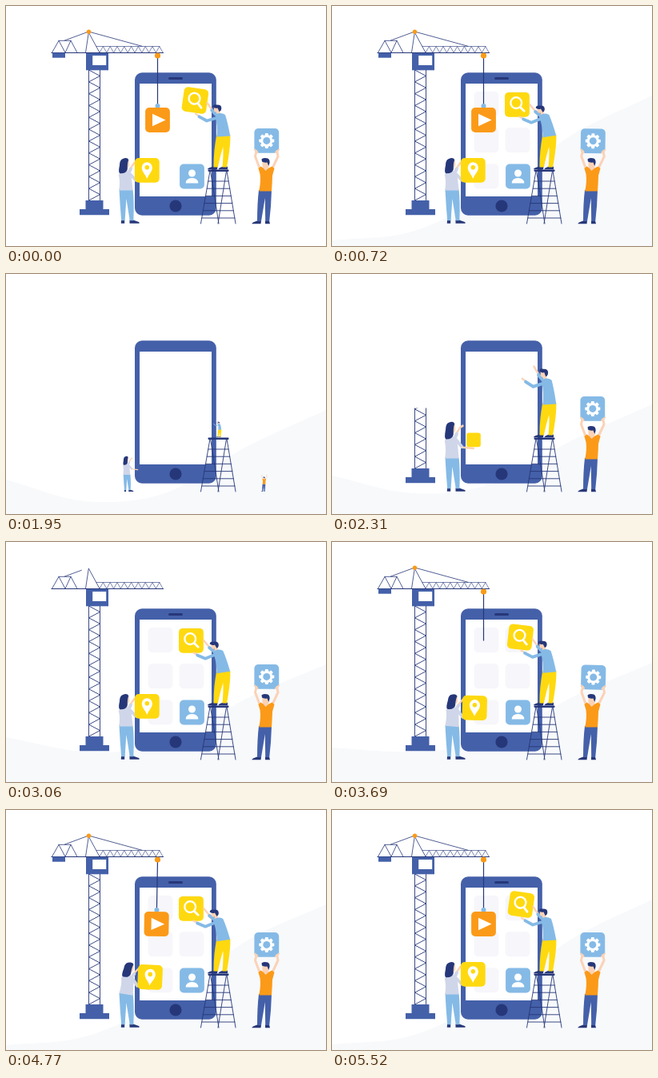
An HTML page with a canvas for the animation above (5.55 s loop, 400 by 300 pixels).

```html
<!DOCTYPE html>
<html lang="en">
<head>
<meta charset="utf-8">
<title>Building an app</title>
<style>
html, body { margin: 0; width: 100%; height: 100%; overflow: hidden; background: #fff; }
canvas { display: block; width: 100vw; height: 100vh; }
</style>
</head>
<body>
<canvas id="stage"></canvas>
<script>
const LOOP = 5550, BUILD = 1410;
const BLUE = '#4460a9', NAVY = '#263779', SKY = '#85bae6', YELLOW = '#ffd90f',
  ORANGE = '#fb9a18', SKIN = '#fbd2b6', LILAC = '#d0d6e9', WHITE = '#fff',
  WAVE = '#f7f9fb', SLOT = '#f6f6fb';

const canvas = document.getElementById('stage');
const ctx = canvas.getContext('2d');
const dpr = window.devicePixelRatio || 1;
canvas.width = 400 * dpr;
canvas.height = 300 * dpr;

const clamp = v => Math.max(0, Math.min(1, v));
const ease = u => u < 0.5 ? 2 * u * u : 1 - 2 * (1 - u) * (1 - u);
const ramp = (t, a, b) => clamp((t - a) / (b - a));
const ramped = (t, a, b) => ease(ramp(t, a, b));
const mix = (a, b, u) => a + (b - a) * u;

function fill(color, d) {
  ctx.fillStyle = color;
  ctx.fill(new Path2D(d));
}

function stroke(color, width, d) {
  ctx.strokeStyle = color;
  ctx.lineWidth = width;
  ctx.lineCap = ctx.lineJoin = 'round';
  ctx.stroke(new Path2D(d));
}

function box(color, x, y, w, h, r = 0) {
  if (w <= 0 || h <= 0) return;
  ctx.fillStyle = color;
  ctx.beginPath();
  ctx.roundRect(x, y, w, h, Math.min(r, w / 2, h / 2));
  ctx.fill();
}

function dot(color, x, y, r) {
  if (r <= 0) return;
  ctx.fillStyle = color;
  ctx.beginPath();
  ctx.arc(x, y, r, 0, 7);
  ctx.fill();
}

// Draws in coordinates centred on x, y
function at(x, y, draw, sx = 1, sy = sx, angle = 0) {
  if (sx <= 0 || sy <= 0) return;
  ctx.save();
  ctx.translate(x, y);
  ctx.rotate(angle);
  ctx.scale(sx, sy);
  draw();
  ctx.restore();
}

// Draws in stage coordinates, transformed around a pivot
function around(x, y, draw, sx = 1, sy = sx, angle = 0) {
  at(x, y, () => { ctx.translate(-x, -y); draw(); }, sx, sy, angle);
}

function clipped(x, y, w, h, draw) {
  ctx.save();
  ctx.beginPath();
  ctx.rect(x, y, w, h);
  ctx.clip();
  draw();
  ctx.restore();
}

function zigzag(points) {
  return 'M' + points.map(p => p.join(' ')).join('L');
}

const tile = color => box(color, -15.4, -15.4, 30.8, 30.8, 5);

// Time, then wave heights at x = 0, 100, 200, 300, 400
const waves = [
  [1410, 265, 299, 291, 229, 180],
  [1530, 263, 296, 287, 226, 178],
  [2310, 252, 274, 262, 208, 163],
  [3060, 244, 262, 252, 196, 153],
  [3690, 257, 262, 248, 194, 151],
  [4770, 294, 283, 237, 164, 118],
  [5520, 293, 282, 233, 161, 112]
];

function drawWave(b) {
  let i = 0;
  while (i < waves.length - 2 && b > waves[i + 1][0]) i++;
  const u = ramp(b, waves[i][0], waves[i + 1][0]);
  const y = waves[i].slice(1).map((v, n) => mix(v, waves[i + 1][n + 1], u));
  const slope = n => n === 0 ? y[1] - y[0] : n === 4 ? y[4] - y[3] : (y[n + 1] - y[n - 1]) / 2;
  let d = `M0 300V${y[0]}`;
  for (let n = 0; n < 4; n++) {
    const x = n * 100;
    d += `C${x + 33.3} ${y[n] + slope(n) / 3} ${x + 66.7} ${y[n + 1] - slope(n + 1) / 3} ${x + 100} ${y[n + 1]}`;
  }
  fill(WAVE, d + 'V300Z');
}

function drawPhone(b, light) {
  const h = 178.4 * ramped(b, 1410, 1860), top = 261.7 - h;
  box(BLUE, 161, top, 101.8, h, 9);
  box(WHITE, 167, top + 13.7, 90, h - 37.5);
  dot(NAVY, 212, 250, 7.6 * ramped(b, 1700, 1900));
  const s = ramped(b, 2380, 2560);
  box(NAVY, 212 - 9 * s, 89, 18 * s, 3, 1.5);
  if (!light) return;
  for (let i = 0; i < 6; i++) {
    const x = 193 + (i % 2) * 39, y = 122.5 + (i >> 1) * 45.2;
    at(x, y, () => tile(SLOT), ramped(b, 2400 + i * 30, 2650 + i * 30));
  }
}

function drawUser(b) {
  at(232.5, 213, () => {
    tile(SKY);
    dot(WHITE, 0, -4, 4.5);
    fill(WHITE, 'M-7.8 8.5Q-7.5 2 0 2Q7.5 2 7.8 8.5Z');
  }, ramped(b, 2550, 2850));
}

function drawSearch(b, tilt) {
  at(mix(231.4, 236.4, tilt), mix(123.3, 118, tilt), () => {
    tile(YELLOW);
    ctx.strokeStyle = WHITE;
    ctx.lineWidth = 2.3;
    ctx.beginPath();
    ctx.arc(-1.2, -2.2, 6.9, 0, 7);
    ctx.stroke();
    stroke(WHITE, 2.8, 'M4.2 3.4L8.8 8');
  }, ramped(b, 2500, 2800), undefined, 0.14 * tilt);
}

function drawPin(b, bend) {
  const s = ramped(b, 2150, 2450);
  at(mix(178, 176.3, s) + 4 * bend, mix(210, 205.4, s) + 3.8 * bend, () => {
    tile(YELLOW);
    const p = ramped(b, 2400, 2600);
    at(0, 0, () => {
      fill(WHITE, 'M0 10.5C-2 5-6.6 2-6.6-3.6A6.6 6.6 0 0 1 6.6-3.6C6.6 2 2 5 0 10.5Z');
      dot(YELLOW, 0, -3.6, 2.8);
    }, p);
  }, s, s, 0.05 * bend);
}

function drawCrane(b, t) {
  const base = ramped(b, 1980, 2180);
  clipped(90, 262 - 20 * base, 42, 20 * base, () => {
    box(BLUE, 92, 254, 37, 7.3);
    box(BLUE, 99.5, 243, 22, 11.5);
  });

  const rise = 163 * ramp(b, 2200, 2440);
  clipped(100, 243 - rise, 22, rise, () => {
    const nodes = [];
    for (let i = 0; i <= 22; i++) nodes.push([i % 2 ? 117.5 : 103.5, 80 + i * 7.41]);
    stroke(NAVY, 0.9, 'M103.5 80V243M117.5 80V243' + zigzag(nodes));
  });

  const cab = ramped(b, 2400, 2510);
  around(114, 80, () => {
    box(BLUE, 100, 58.3, 28, 22);
    box(WHITE, 108.2, 62, 17, 12);
  }, cab);

  const jib = ramped(b, 2420, 2520);
  if (jib > 0) stroke(NAVY, 1.2, `M${114 - 57 * jib} 58.5H${114 + 82.5 * jib}`);
  const lattice = ramped(b, 2500, 2800);
  clipped(114 - 58 * lattice, 40, 142 * lattice, 20, () => {
    stroke(NAVY, 0.8, 'M57.5 58.3L66 43.3L74 58.3L81 43.3L89 58.3M66 43.3H81');
    const nodes = [];
    for (let i = 0; i <= 18; i++) nodes.push([117 + i * 4.4, i % 2 ? 50.5 : 58.3]);
    stroke(NAVY, 0.6, zigzag(nodes) + 'M113 50.5H192');
  });
  const peak = 26 * ramped(b, 2780, 2950);
  clipped(98, 59 - peak, 22, peak, () => stroke(NAVY, 0.8, 'M99.5 58.3L103.3 33L117 58.3'));
  const tie = ramp(b, 2970, 3100), stay = ramped(b, 3100, 3300);
  if (tie > 0) stroke(NAVY, 0.8, `M73.5 43L${mix(73.5, 103.3, tie)} ${mix(43, 32, tie)}`);
  if (stay > 0) stroke(NAVY, 0.8, `M103.3 32L${mix(103.3, 170, stay)} ${mix(32, 50.3, stay)}`);
  box(BLUE, 58, 58.5, 16, 6.2 * ramped(b, 3100, 3300));
  dot(ORANGE, 103.5, 32.2, 2.7 * ramped(b, 3150, 3330));

  const calm = clamp((5370 - t) / 1000);
  const swing = b > 4100 && b < 5370 ? -0.03 * calm * Math.sin((b - 4100) / 960 * 2 * Math.PI) : 0;
  at(189.5, 62, () => {
    const drop = ramped(b, 3400, 3660);
    if (drop > 0) stroke(NAVY, 1.2, `M0 2V${mix(2, 61, drop)}`);
    dot(SKY, 0, 63, 3 * ramped(b, 3700, 3860));
    at(0, 80.5, () => {
      tile(ORANGE);
      fill(WHITE, 'M-6.5-7.7L10 0L-6.5 7.7Z');
    }, ramped(b, 3750, 4080));
  }, 1, 1, swing);
  dot(ORANGE, 189.5, 62, 3.6 * ramped(b, 3280, 3450));
}

function drawLadder(b) {
  const h = 70 * ramped(b, 1650, 1920);
  clipped(240, 273 - h, 50, h, () => {
    let d = 'M255 206L243.5 272M255.5 206L266 272M275.5 206L265 272M276 206L287 272';
    for (let i = 0; i < 6; i++) {
      const y = 219 + i * 9.2, w = (y - 206) * 0.17;
      d += `M${255 - w} ${y}H${276 + w}`;
    }
    stroke(NAVY, 0.9, d);
    box(NAVY, 252.5, 204.5, 26, 2.4, 0.8);
  });
}

function drawClimber(b, tilt) {
  const s = ramped(b, 1850, 2150);
  const settle = ramped(b, 2400, 2750);
  around(266, 204, () => {
    fill(NAVY, 'M252 204Q252.5 202 259 200.8H264.5L264 204.3H252Z');
    fill(NAVY, 'M265.5 204Q266 202 271 200.8H277V204.3H265.5Z');
    fill(YELLOW, 'M263.5 161H280.3Q281 174 276 201.5H270.5Q272 186 271.3 176Q267.5 188 264.8 201.5H259.5Q259.5 178 263.5 161Z');
    around(272, 163, () => {
      stroke(SKIN, 2.4, 'M259 132L252.5 122.5L251.5 121');
      stroke(SKY, 4.2, 'M264 137L257.5 130.5');
      fill(SKIN, 'M260 125H267V131L268.5 136H263.5V132.5Q260 133 260 130Z');
      fill(NAVY, 'M258.3 126Q259 122.5 263 123.6Q269.5 123 269.3 128Q269 131.5 266.5 132L264.5 127.5Q261 128.5 258.3 126Z');
      fill(SKY, 'M263 135Q269 132.5 274 136Q277 145 280.3 162.5L263.5 163.5Q264.5 149 262 140Z');
      stroke(SKIN, 2.2, 'M241 137.5L237 134.8');
      stroke(SKY, 3.8, 'M266 139L251 143.5L241.5 138.3');
    }, 1, mix(1.12, 1, settle), mix(0.02, -0.1 * (1 - tilt), settle));
  }, s);
}

function drawWoman(b, bend) {
  const s = ramped(b, 1800, 2100);
  const settle = ramped(b, 2350, 2700);
  around(152, 272, () => {
    fill(NAVY, 'M144 267.5H148.2V271.8H143.8Z');
    fill(NAVY, 'M154.5 267.5H159L166 270Q167.8 271.8 165.5 271.8H154.5Z');
    fill(SKY, 'M141.5 229H158.5Q160.5 245 159.3 268.3H154.8L150.4 241L148.6 268.3H144.2Q142.5 250 141.5 229Z');
    around(150, 231, () => {
      stroke(SKIN, 2.4, 'M154 205L160.5 196L163.5 194.5');
      fill(SKIN, 'M149 193H153.5L154.2 198Q154 202 151.5 202V208H148Z');
      fill(LILAC, 'M143 208Q150 204 155.5 207.5Q157.5 216 158.5 230.5H141.2Q143 219 140.8 211Z');
      stroke(LILAC, 4, 'M153 209.5L156 203.5');
      fill(NAVY, 'M146 191Q151.5 188.7 153.3 192.3Q151.5 196 151.8 204Q150.5 209.8 142.3 209.3Q140 208 142 199Q142 192.3 146 191Z');
      stroke(LILAC, 4, 'M155 210L162 217.5');
      stroke(SKIN, 2.2, 'M163.5 218.3L177 219.5');
    }, 1, mix(1.13, 1, settle), 0.17 * bend);
  }, s);
}

function drawGear() {
  tile(SKY);
  for (let i = 0; i < 8; i++) {
    at(0, 0, () => box(WHITE, -2, -9.5, 4, 5, 0.8), 1, 1, i * Math.PI / 4);
  }
  dot(WHITE, 0, 0, 7.5);
  dot(SKY, 0, 0, 4.5);
}

function drawCarrier(b, sway) {
  const s = ramped(b, 1850, 2150);
  around(322, 272, () => {
    fill(NAVY, 'M307.3 272Q308 270.3 314 268.5H319L318.5 272.2H307.3Z');
    fill(NAVY, 'M324 268.5H329L330 272.2H324Z');
    fill(BLUE, 'M316 230H332Q331.5 250 329.2 269H324.2L323.8 240L319 269H314Q314 247 316 230Z');
    around(324, 206, () => {
      at(325.8, 168.4 + 0.6 * sway, drawGear, ramped(b, 2000, 2260));
      stroke(SKIN, 3, 'M317.5 204L311.5 188L313 181.5M332.5 204L340 188L338.8 181.5');
      stroke(SKIN, 2, 'M311 179.5L314.5 183M341 179.5L337 183');
    }, 1, 1, 0.025 * sway);
    fill(SKIN, 'M320.5 194H328.5V200L328 206H321.5V203Q320 201 320.5 194Z');
    fill(NAVY, 'M319.5 191.5Q321 189.3 326 190.3Q330 191 329.6 196L328.3 200L326.5 195.5Q322 196 320 194.5Z');
    fill(ORANGE, 'M315.5 203L318.5 200.5L321.5 202.5L324.5 206L328.5 202.5L332.5 200.5L335.5 203L333 212Q332.8 221 332 231.5H316.3Q318.8 219 317.5 210Z');
  }, s);
}

function draw(t) {
  const b = t < BUILD ? 9999 : t;
  const light = t >= 30;
  const tilt = t < BUILD ? 1 - ramped(t, 0, 600)
    : ramped(t, 3120, 3950) - ramped(t, 3950, 4700) + ramped(t, 4830, 5500);
  const bend = t < BUILD ? 0 : ramped(t, 3250, 4130) - ramped(t, 4650, 5370);
  const sway = Math.sin(Math.PI * ramp(t, 570, 1170)) ** 2
    + Math.sin(Math.PI * ramp(t, 3120, 4220)) ** 2;

  ctx.setTransform(dpr, 0, 0, dpr, 0, 0);
  ctx.fillStyle = WHITE;
  ctx.fillRect(0, 0, 400, 300);
  if (light) drawWave(b);
  drawPhone(b, light);
  drawUser(b);
  drawCrane(b, t);
  drawSearch(b, tilt);
  drawLadder(b);
  drawClimber(b, tilt);
  drawWoman(b, bend);
  drawPin(b, bend);
  drawCarrier(b, sway);
}

function tick() {
  draw(performance.now() % LOOP);
  requestAnimationFrame(tick);
}
tick();
</script>
</body>
</html>
```
